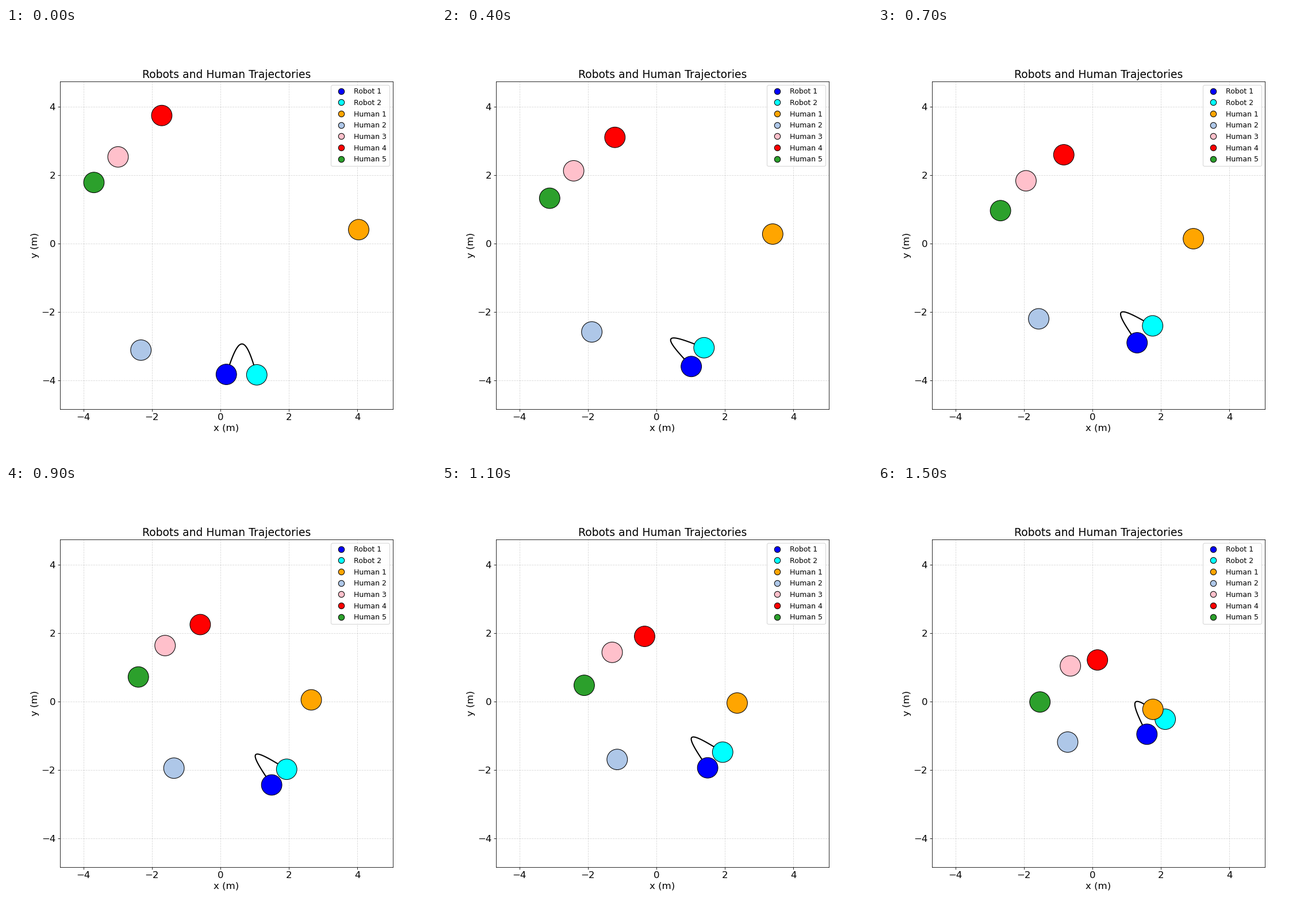
Animation of 748 by 748 pixels, one loop 1600 ms. Source, as a matplotlib script:

```python
import numpy as np
import matplotlib.pyplot as plt
from matplotlib.animation import FuncAnimation
from matplotlib.lines import Line2D

FRAMES = 16
RADIUS = 0.3
STEP = 0.25          # distance a robot covers per frame at full speed
TURN = np.pi / 8     # robots steer in sixteenths of a full turn
CABLE = 2.0

COLORS = {
    "Robot 1": "blue",
    "Robot 2": "cyan",
    "Human 1": "orange",
    "Human 2": "#aec7e8",
    "Human 3": "pink",
    "Human 4": "red",
    "Human 5": "#2ca02c",
}

# Waypoints of each human at the frames in KEYS
KEYS = [0, 2, 5, 15]
HUMANS = [
    [(4.041, 0.405), (3.704, 0.363), (3.247, 0.233), (1.770, -0.228)],
    [(-2.319, -3.113), (-2.097, -2.839), (-1.778, -2.453), (-0.720, -1.184)],
    [(-2.987, 2.530), (-2.718, 2.312), (-2.262, 2.030), (-0.641, 1.041)],
    [(-1.711, 3.739), (-1.472, 3.428), (-1.078, 2.937), (0.149, 1.214)],
    [(-3.692, 1.783), (-3.407, 1.560), (-2.970, 1.204), (-1.530, -0.013)],
]


def robot_path(start, turns, speeds):
    """Positions after each step, given headings in units of TURN."""
    angles = TURN * np.array(turns)
    moves = STEP * np.array(speeds)[:, None] * np.c_[np.cos(angles), np.sin(angles)]
    return np.vstack([start, start + np.cumsum(moves, axis=0)])


def human_path(points):
    x, y = np.transpose(points)
    t = np.arange(FRAMES)
    return np.c_[np.interp(t, KEYS, x), np.interp(t, KEYS, y)]


def cable_curve(a, b):
    """Half a sine wave bulging to the left of the line from a to b."""
    span = b - a
    dist = np.hypot(*span)
    normal = np.array([-span[1], span[0]]) / dist
    sag = np.sqrt(max(CABLE**2 - dist**2, 0)) / 2
    t = np.linspace(0, 1, 100)[:, None]
    return a + t * span + sag * np.sin(np.pi * t) * normal


paths = [
    robot_path((0.175, -3.822), [0] * 3 + [3] * 6 + [4] * 5 + [3], [1] * 15),
    robot_path((1.065, -3.835), [3] * 6 + [2] * 2 + [4] * 5 + [3] * 2,
               [0.713] * 2 + [1] * 13),
] + [human_path(points) for points in HUMANS]

fig, ax = plt.subplots(figsize=(10, 10), dpi=74.8)
ax.set_xlim(-4.69, 5.043)
ax.set_ylim(-4.829, 4.734)
ax.set_aspect("equal")
ax.set_xticks(range(-4, 5, 2))
ax.set_yticks(range(-4, 5, 2))
ax.tick_params(labelsize=16)
ax.set_xlabel("x (m)", fontsize=16)
ax.set_ylabel("y (m)", fontsize=16)
ax.set_title("Robots and Human Trajectories", fontsize=18)
ax.grid(True, linestyle="--", alpha=0.5)

cable, = ax.plot([], [], color="black", lw=2, zorder=2)
agents = [
    ax.add_patch(plt.Circle(path[0], RADIUS, facecolor=color, edgecolor="black",
                            lw=1, zorder=3))
    for path, color in zip(paths, COLORS.values())
]
handles = [
    Line2D([], [], marker="o", linestyle="none", markersize=10, label=name,
           markerfacecolor=color, markeredgecolor="black")
    for name, color in COLORS.items()
]
ax.legend(handles=handles, loc="upper right", fontsize=12, labelspacing=0.535)


def update(frame):
    for agent, path in zip(agents, paths):
        agent.center = path[frame]
    cable.set_data(*cable_curve(paths[0][frame], paths[1][frame]).T)
    return [cable, *agents]


anim = FuncAnimation(fig, update, frames=FRAMES, init_func=lambda: update(0),
                     interval=100, repeat=True, repeat_delay=0)
plt.show()
```
